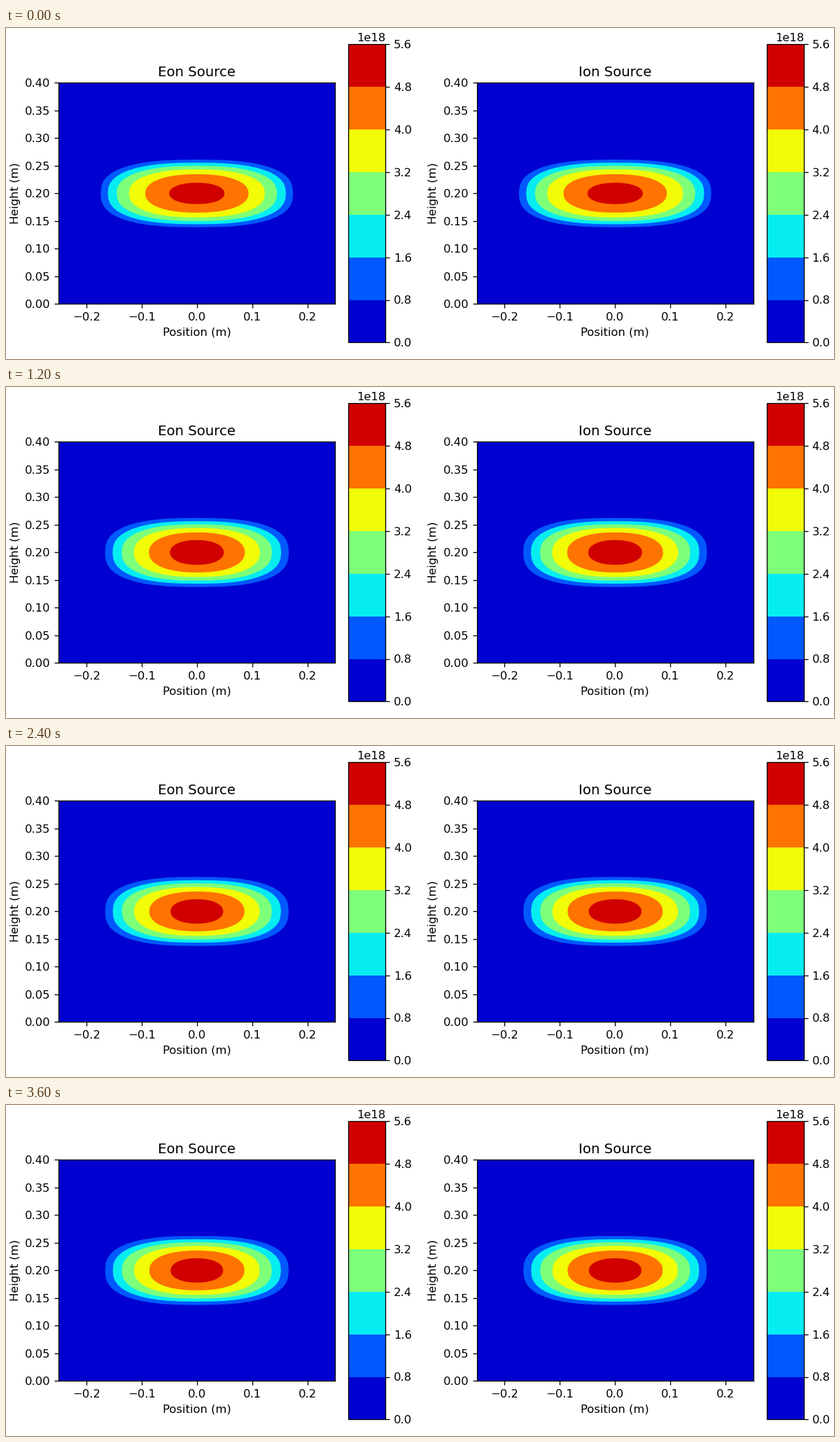
Write a matplotlib script that moves like this. It is 1183 px wide and 473 px high and loops after 4.6 s.

```python
import numpy as np
import matplotlib.pyplot as plt
from matplotlib.animation import FuncAnimation
from matplotlib.cm import ScalarMappable
from matplotlib.colors import BoundaryNorm, ListedColormap

W, H, DPI = 1183, 473, 118.25
FRAME_MS, LOOP_MS, STEP_MS = 200, 4600, 400
LAST_STEP = 9

LEVELS = np.arange(8) * 0.8e18
COLORS = plt.get_cmap("jet")((np.arange(7) + 0.5) / 7)

# Half-widths (x, y) in mm of the contours, outermost first
START = np.array([[174, 161, 145, 123, 93.5, 50],
                  [61.2, 55.7, 50, 43.5, 34.8, 19.3]])
SWELL = np.array([[167, 153.5, 137, 115.5, 89, 52.5],
                  [62.7, 57, 51, 45, 37.2, 23.5]])
STEADY = np.array([[166, 152, 135.5, 113.5, 86, 47.5],
                   [62.5, 56.5, 51, 44.2, 36, 22]])

# Superellipse exponents: outer contours are boxier than the core
POWERS = np.linspace(2.6, 2.15, 6)
ANGLES = np.linspace(0, 2 * np.pi, 48, endpoint=False)


def half_widths(step):
    """A first jump, then decay to the steady state."""
    if step == 0:
        return START
    return STEADY + (SWELL - STEADY) * 0.5 ** (step - 1)


def outline(a, b, power):
    """Superellipse around the centre of the chamber, in metres."""
    c, s = np.cos(ANGLES), np.sin(ANGLES)
    px = a * np.sign(c) * np.abs(c) ** (2 / power)
    py = b * np.sign(s) * np.abs(s) ** (2 / power)
    return np.column_stack([px / 1000, 0.2 + py / 1000])


def outlines(step):
    return [outline(a, b, p) for a, b, p in zip(*half_widths(step), POWERS)]


def pixel_axes(left, top, width, height):
    return fig.add_axes([left / W, 1 - (top + height) / H,
                         width / W, height / H])


def make_panel(left, title):
    ax = pixel_axes(left, 78.4, 395, 316)
    ax.set_facecolor(COLORS[0])
    ax.set_title(title)
    ax.set_xlabel("Position (m)")
    ax.set_ylabel("Height (m)")
    ax.set(xlim=(-0.25, 0.25), ylim=(0, 0.4))
    ax.set_xticks(np.arange(-2, 3) / 10)
    ax.set_yticks(np.arange(9) / 20)
    bands = [ax.add_patch(plt.Polygon(points, facecolor=color, linewidth=0))
             for points, color in zip(outlines(0), COLORS[1:])]

    cax = pixel_axes(left + 414.1, 23.46, 53.15, 425.88)
    scale = ScalarMappable(BoundaryNorm(LEVELS, 7), ListedColormap(COLORS))
    fig.colorbar(scale, cax=cax, ticks=LEVELS).minorticks_off()
    return bands


plt.rcParams["font.family"] = "DejaVu Sans"
fig = plt.figure(figsize=(W / DPI, H / DPI), dpi=DPI, facecolor="white")
panels = [make_panel(75.2, "Eon Source"), make_panel(672.8, "Ion Source")]


def update(frame):
    step = min(frame * FRAME_MS // STEP_MS, LAST_STEP)
    shapes = outlines(step)
    for bands in panels:
        for band, points in zip(bands, shapes):
            band.set_xy(points)
    return []


anim = FuncAnimation(fig, update, frames=LOOP_MS // FRAME_MS,
                     interval=FRAME_MS, repeat=True, repeat_delay=0,
                     init_func=lambda: [])
plt.show()
```
